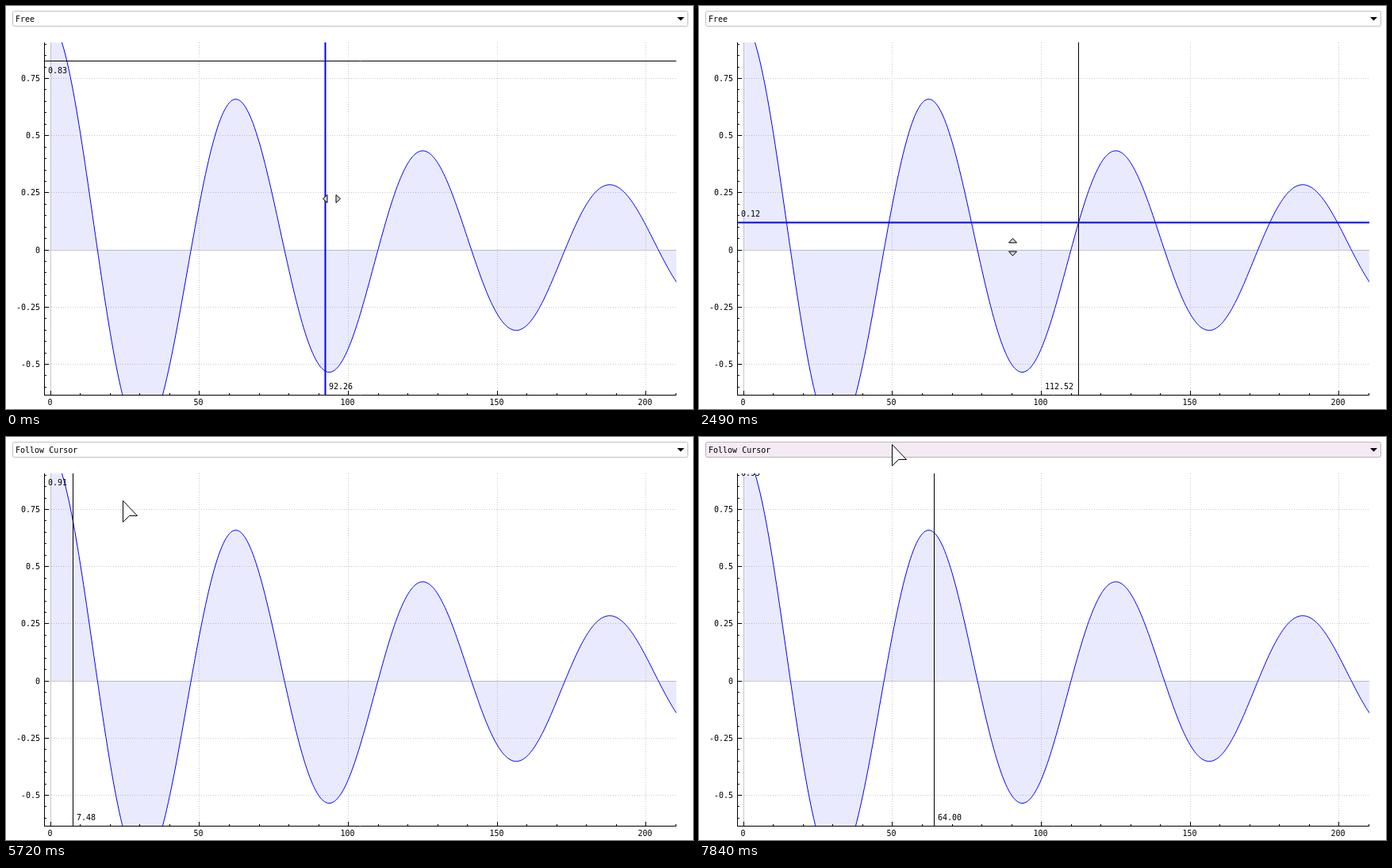
Animation of 866x509 px, one loop 8000 ms. Source, as an HTML page with a canvas:

```html
<!DOCTYPE html>
<html lang="en">
<head>
<meta charset="utf-8">
<title>Plot cursor</title>
<style>
  html, body { margin: 0; width: 100%; height: 100%; overflow: hidden; background: #fff; }
  canvas { display: block; }
</style>
</head>
<body>
<canvas id="stage" width="866" height="509"></canvas>
<script>
const ctx = document.getElementById('stage').getContext('2d');
const LOOP = 8000;
const LEFT = 48, RIGHT = 845, TOP = 46, BOTTOM = 491;
const X0 = 55.93, X_SCALE = 3.751, Y0 = 307.6, Y_SCALE = 288.8;
const toX = v => X0 + v * X_SCALE;
const toY = v => Y0 - v * Y_SCALE;
const BLUE = '#0000ff', GREY = '#c8c8c8';

// Pointer paths: keys are [step, x, y]; step 1 falls on `start`, the last on `end`.
const moves = {
  dragRight: { start: 60, end: 740, steps: 12,
    keys: [[0, 410, 243], [9, 608, 247], [10, 623, 247], [12, 688, 247]] },
  dragLeft: { start: 920, end: 1640, steps: 12,
    keys: [[0, 688, 247], [7, 478, 245], [8, 478, 243], [12, 395, 72]] },
  dragDown: { start: 1890, end: 2670, steps: 13,
    keys: [[0, 395, 72], [2, 395, 77], [3, 395, 86], [11, 395, 335], [13, 395, 358]] },
  toCombo: { start: 2920, end: 3670, steps: 13,
    keys: [[0, 395, 358], [8, 176, 66], [13, 110, 12]] },
  pickItem: { start: 3750, end: 4540, steps: 13,
    keys: [[0, 110, 12], [3, 108, 14], [10, 86, 43], [13, 84, 45]] },
  follow: { start: 5720, end: 7840, steps: 35,
    keys: [[0, 84, 45], [5, 400, 220], [9, 565, 281], [10, 580, 281], [14, 620, 275],
           [20, 600, 215], [27, 460, 130], [34, 296, 33], [35, 243, 9]] }
};

function stepAt(move, t) {
  if (t < move.start) return 0;
  const length = (move.end - move.start) / (move.steps - 1);
  return Math.min(move.steps, 1 + Math.floor((t - move.start) / length + 0.3));
}

function pointAt(keys, step) {
  let i = 1;
  while (i < keys.length - 1 && keys[i][0] < step) i++;
  const [s0, x0, y0] = keys[i - 1], [s1, x1, y1] = keys[i];
  const f = Math.max(0, Math.min(1, (step - s0) / (s1 - s0)));
  return { x: x0 + (x1 - x0) * f, y: y0 + (y1 - y0) * f };
}

// The crosshair trails the pointer by one step.
function stateAt(t) {
  const name = Object.keys(moves).filter(n => n === 'dragRight' || t >= moves[n].start).pop();
  const { keys, steps } = moves[name];
  const step = stepAt(moves[name], t);
  const pointer = pointAt(keys, step);
  const trail = pointAt(keys, step - 1);
  const settled = step === steps ? pointer : trail;
  const s = { pointer, vx: 478, hy: 358, shape: 'arrow', active: '',
              open: t >= 3750 && t < 5570, text: t < 5570 ? 'Free' : 'Follow Cursor' };
  if (name === 'dragRight') {
    Object.assign(s, { vx: step ? settled.x : 402, hy: 69, shape: 'split-x', active: 'v' });
  } else if (name === 'dragLeft') {
    const dragging = step < 8;
    Object.assign(s, { vx: dragging ? trail.x : 478, hy: 69,
      shape: dragging ? 'split-x' : step < steps ? 'arrow' : 'split-y',
      active: dragging ? 'v' : '' });
  } else if (name === 'dragDown') {
    Object.assign(s, { hy: step < 2 ? 69 : settled.y, shape: 'split-y', active: 'h' });
  } else if (name === 'follow') {
    Object.assign(s, { vx: trail.x, hy: trail.y });
  }
  s.hover = s.open || pointer.y < 26;
  return s;
}

function line(x1, y1, x2, y2, color = '#000', width = 1, dash = []) {
  ctx.strokeStyle = color;
  ctx.lineWidth = width;
  ctx.setLineDash(dash);
  ctx.beginPath();
  ctx.moveTo(x1, y1);
  ctx.lineTo(x2, y2);
  ctx.stroke();
  ctx.setLineDash([]);
}

const vLine = (x, y1, y2, ...style) => line(Math.round(x) + 0.5, y1, Math.round(x) + 0.5, y2, ...style);
const hLine = (y, x1, x2, ...style) => line(x1, Math.round(y) + 0.5, x2, Math.round(y) + 0.5, ...style);

function text(str, x, middle, align = 'left', color = '#000') {
  ctx.font = '10px "DejaVu Sans Mono", monospace';
  ctx.textAlign = align;
  ctx.fillStyle = color;
  ctx.fillText(str, x, middle + 4);
}

function polygon(points, fill) {
  ctx.beginPath();
  points.forEach(([x, y]) => ctx.lineTo(x, y));
  ctx.closePath();
  ctx.fillStyle = fill;
  ctx.fill();
}

function outlined(points, fill) {
  polygon(points, fill);
  ctx.strokeStyle = '#000';
  ctx.lineWidth = 1;
  ctx.stroke();
}

function clipPlot() {
  ctx.save();
  ctx.beginPath();
  ctx.rect(LEFT, TOP, RIGHT - LEFT, BOTTOM - TOP);
  ctx.clip();
}

function drawPlot() {
  for (let v = 0; v <= 200; v += 50) vLine(toX(v), TOP, BOTTOM, GREY, 1, v ? [1, 2] : []);
  for (let v = -0.5; v <= 0.75; v += 0.25) hLine(toY(v), LEFT, RIGHT, GREY, 1, v ? [1, 2] : []);

  clipPlot();
  const curve = [];
  for (let v = 0; v <= 211; v += 0.5) {
    curve.push([toX(v) + 0.5, toY(Math.exp(-v / 150) * Math.cos(v / 10)) + 0.5]);
  }
  const base = toY(0) + 0.5;
  polygon([[curve[0][0], base], ...curve, [curve[curve.length - 1][0], base]], 'rgba(0,0,255,0.082)');
  ctx.beginPath();
  curve.forEach(([x, y]) => ctx.lineTo(x, y));
  ctx.strokeStyle = BLUE;
  ctx.lineWidth = 1;
  ctx.stroke();
  ctx.restore();
}

function drawAxes() {
  vLine(LEFT, TOP, BOTTOM + 1);
  hLine(BOTTOM, LEFT, RIGHT);
  for (let i = 0; i <= 21; i++) {
    const major = i % 5 === 0, x = toX(i * 10);
    vLine(x, BOTTOM - (major ? 5 : 2), BOTTOM);
    if (major) text(String(i * 10), Math.round(x) - 0.5, 500, 'center');
  }
  for (let i = -12; i <= 18; i++) {
    const major = i % 5 === 0, y = toY(i / 20);
    hLine(y, LEFT, LEFT + (major ? 6 : 3));
    if (major) text(String(i / 20), 43, Math.round(y), 'right');
  }
}

function drawCrosshair({ vx, hy, active }) {
  const x = Math.round(vx), y = Math.round(hy);
  const style = id => active === id ? [BLUE, 2] : ['#000', 1];
  clipPlot();
  hLine(y, LEFT, RIGHT, ...style('h'));
  vLine(x, TOP, BOTTOM, ...style('v'));
  text(((Y0 - y) / Y_SCALE).toFixed(2), 53, y < (TOP + BOTTOM) / 2 ? y + 12 : y - 11);
  const onLeft = x < (LEFT + RIGHT) / 2;
  text(((x - X0) / X_SCALE).toFixed(2), onLeft ? x + 5 : x - 6, 480, onLeft ? 'left' : 'right');
  ctx.restore();
}

function drawCombo({ hover, text: label }) {
  ctx.beginPath();
  ctx.roundRect(8.5, 6.5, 851, 19, 2);
  ctx.fillStyle = hover ? '#f3eaf3' : '#fff';
  ctx.fill();
  ctx.strokeStyle = hover ? '#bcb2bc' : '#c0c0c0';
  ctx.lineWidth = 1;
  ctx.stroke();
  text(label, 12, 16);
  polygon([[846, 14], [855, 14], [850.5, 18.5]], '#000');
}

function drawPopup(pointer) {
  ctx.fillStyle = 'rgba(0,0,0,0.3)';
  ctx.fillRect(12, 63, 851, 2);
  ctx.fillRect(860, 30, 2, 33);
  ctx.fillStyle = 'rgba(0,0,0,0.12)';
  ctx.fillRect(12, 65, 851, 1);
  ctx.fillRect(862, 30, 1, 35);
  ctx.fillStyle = '#fff';
  ctx.fillRect(8, 25, 852, 38);
  ctx.strokeStyle = '#777';
  ctx.strokeRect(8.5, 25.5, 851, 37);
  const selected = pointer.y < 38 ? 0 : 1;
  ['Free', 'Follow Cursor', 'Tracing'].forEach((item, i) => {
    const y = 26 + i * 12;
    if (i === selected) {
      ctx.fillStyle = '#eedfee';
      ctx.fillRect(9, y, 850, 12);
      ctx.strokeStyle = '#000';
      ctx.setLineDash([1, 1]);
      ctx.strokeRect(9.5, y + 0.5, 849, 11);
      ctx.setLineDash([]);
    }
    text(item, 12, y + 6.5, 'left', i === selected ? '#8558c0' : '#000');
  });
}

function drawPointer({ pointer, shape }) {
  ctx.save();
  ctx.translate(Math.round(pointer.x) + 0.5, Math.round(pointer.y) + 0.5);
  if (shape === 'arrow') {
    outlined([[0, 0], [0, 27], [8, 19], [18, 19]], 'rgba(255,255,255,0.75)');
  } else {
    if (shape === 'split-y') ctx.rotate(Math.PI / 2);
    for (const side of [-1, 1]) {
      outlined([[side * 11, 0], [side * 5.5, -5], [side * 5.5, 5]], '#d4d4de');
    }
  }
  ctx.restore();
}

function draw(t) {
  const state = stateAt(t);
  ctx.fillStyle = '#fff';
  ctx.fillRect(0, 0, 866, 509);
  drawPlot();
  drawAxes();
  drawCrosshair(state);
  drawCombo(state);
  if (state.open) drawPopup(state.pointer);
  drawPointer(state);
}

const began = performance.now();
function tick() {
  draw((performance.now() - began) % LOOP);
  requestAnimationFrame(tick);
}
tick();
</script>
</body>
</html>
```
